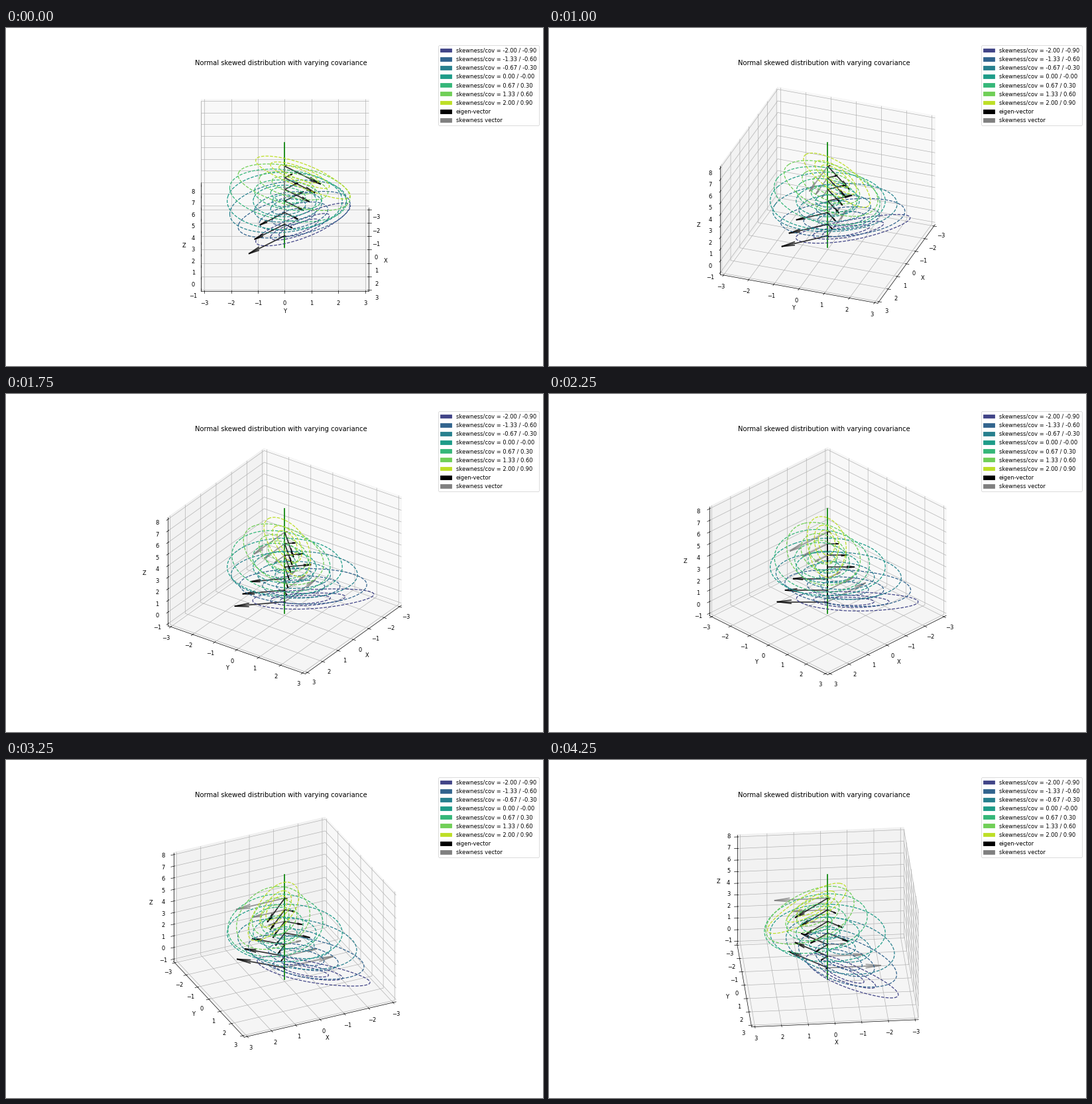
A matplotlib script for the animation above (4500 ms loop, 810x510 px).

```python
import math

import matplotlib.pyplot as plt
import numpy as np
from matplotlib.animation import FuncAnimation
from matplotlib.patches import Patch

FRAMES, INTERVAL, STEP = 18, 250, 5
LEVELS = (0.1, 0.5, 0.9)
COUNT = 7

plt.rcParams["font.family"] = "DejaVu Sans"
erf = np.vectorize(math.erf)


def skew_normal(x, y, skew, cov):
    """Skewed bivariate normal, scaled to 1 at the origin."""
    quad = (x * x - 2 * cov * x * y + y * y) / (1 - cov * cov)
    return np.exp(-quad / 2) * (1 + erf(skew * x / math.sqrt(2)))


def scaled_eigenvectors(cov):
    sign = -1 if cov < -1e-9 else 1
    major = (1 + abs(cov)) * np.array([1, sign])
    minor = (1 - abs(cov)) * np.array([-sign, 1])
    return major / math.sqrt(2), minor / math.sqrt(2)


def arrow(vector, height, color):
    ax.quiver(0, 0, height, *vector, 0, color=color, alpha=0.8, linewidth=2)


def padded(low, high):
    margin = (high - low) / 48
    return low - margin, high + margin


fig = plt.figure(figsize=(13.5, 8.5), dpi=60)
ax = fig.add_subplot(projection="3d", proj_type="ortho")

grid_x, grid_y = np.meshgrid(np.linspace(-3, 3, 121), np.linspace(-3, 3, 121))
skews = np.linspace(-2, 2, COUNT)
covs = np.linspace(-0.9, 0.9, COUNT)
colors = plt.cm.viridis(np.linspace(0.2, 0.9, COUNT))
handles = []

for height, (skew, cov, color) in enumerate(zip(skews, covs, colors)):
    ax.contour(grid_x, grid_y, skew_normal(grid_x, grid_y, skew, cov),
               levels=LEVELS, zdir="z", offset=height,
               colors=[color], linestyles="dashed")
    for vector in scaled_eigenvectors(cov):
        arrow(vector, height, "black")
    if abs(skew) > 1e-9:
        arrow((skew, 0), height, "grey")
    handles.append(Patch(color=color,
                         label=f"skewness/cov = {skew:.2f} / {cov:.2f}"))

ax.plot([0, 0], [0, 0], [-1, 8], color="green", linewidth=2)

handles += [Patch(color="black", label="eigen-vector"),
            Patch(color="grey", label="skewness vector")]
ax.legend(handles=handles, loc="upper right", bbox_to_anchor=(1.5, 1.1))
ax.set(xlim=padded(-3, 3), ylim=padded(-3, 3), zlim=padded(-1, 8),
       xlabel="X", ylabel="Y", zlabel="Z",
       title="Normal skewed distribution with varying covariance")


def update(frame):
    ax.view_init(elev=30, azim=frame * STEP)
    return ()


anim = FuncAnimation(fig, update, frames=FRAMES, interval=INTERVAL,
                     repeat=True, repeat_delay=0, init_func=lambda: ())
plt.show()
```
